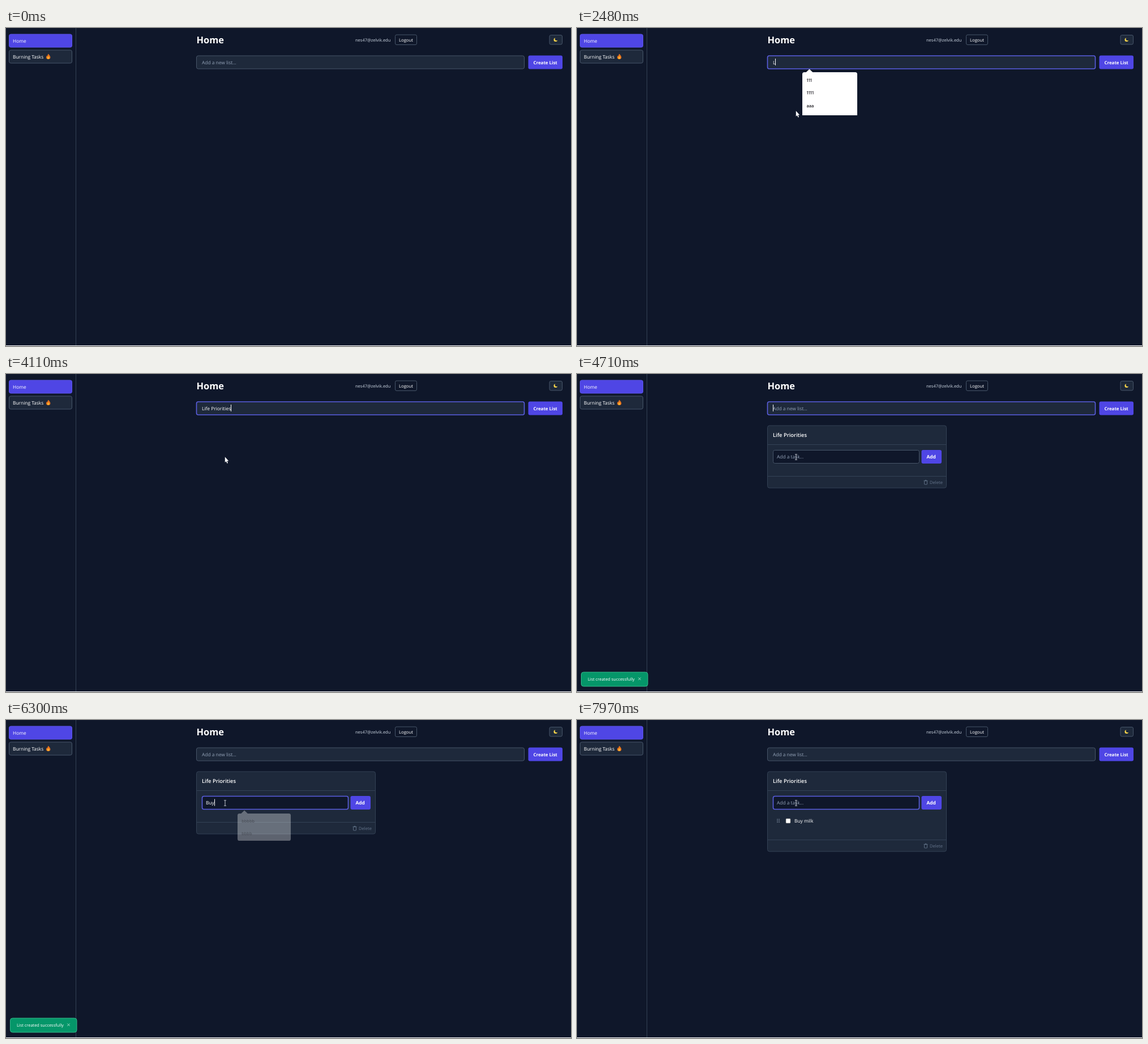
Animation of 998x561 px, one loop 8 s. Source, as an HTML page with a canvas:

```html
<!DOCTYPE html>
<html lang="en">
<head>
<meta charset="utf-8">
<title>Task lists</title>
<style>
html, body { margin: 0; width: 100%; height: 100%; overflow: hidden; background: #0f172a; }
canvas { display: block; width: 998px; height: 561px; }
</style>
</head>
<body>
<canvas id="stage"></canvas>
<script>
const W = 998, H = 561, LOOP = 8000;
const BG = '#0f172a', PANEL = '#1e293b', EDGE = '#475569', LINE = '#334155';
const INDIGO = '#4f46e5', RING = '#5a5ee0', MUTED = '#94a3b8', DIM = '#64748b', WHITE = '#fff';
const SANS = '"Open Sans", "Noto Sans", sans-serif';
const MENU = 'Inter, Roboto, sans-serif';

const stage = document.getElementById('stage');
const ratio = window.devicePixelRatio || 1;
stage.width = W * ratio;
stage.height = H * ratio;
const c = stage.getContext('2d');
c.scale(ratio, ratio);
c.textRendering = 'geometricPrecision';

// Typing: moment at which each character appears
const LIST = {
  text: 'Life Priorities',
  keys: [2480, 2680, 2780, 2900, 3040, 3440, 3510, 3590, 3660, 3740, 3810, 3960, 4040, 4040, 4110],
  cleared: 4660
};
const TASK = {
  text: 'Buy milk',
  keys: [5930, 6200, 6300, 6450, 6840, 6930, 7010, 7260],
  cleared: 7970
};

const within = (t, from, to) => t >= from && t < to;
const ramp = (t, from, to) => Math.min(1, Math.max(0, (t - from) / (to - from)));
const ease = k => k * k * (3 - 2 * k);
const typed = (s, t) => t < s.cleared ? s.text.slice(0, s.keys.filter(k => k <= t).length) : '';

function box(x, y, w, h, r, fill, stroke, width = 1) {
  c.beginPath();
  c.roundRect(x, y, w, h, r);
  if (fill) { c.fillStyle = fill; c.fill(); }
  if (stroke) { c.strokeStyle = stroke; c.lineWidth = width; c.stroke(); }
}

function label(text, x, y, size = 8.4, color = WHITE, weight = 400, family = SANS) {
  c.font = `${weight} ${size}px ${family}`;
  c.fillStyle = color;
  c.fillText(text, x, y);
  return c.measureText(text).width;
}

function strokes(color, width, ...lines) {
  c.strokeStyle = color;
  c.lineWidth = width;
  c.beginPath();
  for (const [x1, y1, x2, y2] of lines) { c.moveTo(x1, y1); c.lineTo(x2, y2); }
  c.stroke();
}

function disc(x, y, r, color) {
  c.fillStyle = color;
  c.beginPath();
  c.arc(x, y, r, 0, 7);
  c.fill();
}

function shape(path, x, y, color) {
  c.save();
  c.translate(x, y);
  c.fillStyle = color;
  c.fill(new Path2D(path));
  c.restore();
}

function field(x, y, w, fill, focused) {
  box(x + .5, y + .5, w - 1, 23, 3, fill, focused ? RING : EDGE, focused ? 1.6 : 1);
}

function fieldText(value, hint, x, y, caret) {
  const w = value ? label(value, x, y) : 0;
  if (!value) label(hint, x, y, 8.4, MUTED);
  if (caret) {
    c.fillStyle = WHITE;
    c.fillRect(Math.round(x + w), y - 9.7, 1, 12);
  }
}

function menu(x, y, items, alpha, cut = H) {
  if (alpha <= 0) return;
  const w = 97, scale = 1 - .045 * (1 - alpha);
  c.save();
  c.beginPath();
  c.rect(0, 0, W, cut);
  c.clip();
  c.globalAlpha = alpha;
  c.translate(x + w / 2, y + 30);
  c.scale(scale, scale);
  c.translate(-w / 2, -30);
  c.fillStyle = WHITE;
  c.beginPath();
  c.roundRect(0, 0, w, items.length * 22.45 + 4.8, 3.5);
  c.moveTo(6.5, .2);
  c.lineTo(12.5, -5.5);
  c.lineTo(18.5, .2);
  c.fill();
  items.forEach((s, i) => label(s, 7.5, 16.8 + i * 22.45, 7.6, '#15141a', 500, MENU));
  c.restore();
}

function page() {
  c.fillStyle = BG;
  c.fillRect(0, 0, W, H);
  c.fillStyle = WHITE;
  c.fillRect(0, 560, W, 1);
  strokes(LINE, 1, [123.5, 0, 123.5, 560]);

  box(5.5, 11, 111, 23, 3, INDIGO, '#5b53e8');
  label('Home', 12, 25.5);
  box(5.5, 39, 111, 23, 3, PANEL, EDGE);
  label('Burning Tasks', 12, 53.5);
  shape('M.3-4.8C1 -3 3.7-1.500 3.700 1.500C3.700 3.500 2 4.600 0 4.600C-2.200 4.600-3.700 3.400-3.700 1.300C-3.700 0-3-1-2.300-2C-2-1.400-1.700-1-1.300-.8C-1.400-2.500-.8-4 .3-4.800Z', 74.700, 50.400, '#e8721c');
  shape('M.2-.6C1 .6 2 1.200 2 2.600C2 3.700 1 4.300 0 4.300C-1.200 4.300-2 3.600-2 2.500C-2 1.300-.4 .7 .2-.6Z', 74.700, 50.400, '#f9b233');

  label('Home', 336.5, 27.3, 16.4, WHITE, 700);
  label('nes47@zelvik.edu', 617, 23.5, 7.5, '#cbd5e1');
  box(687.5, 12, 38, 17.500, 2.500, BG, EDGE);
  label('Logout', 694, 23.500, 7.7);
  box(960, 12.500, 22.500, 16.500, 2.500, PANEL, EDGE);
  disc(970.800, 20.700, 3.300, '#fdd94b');
  disc(972.400, 19.200, 2.800, PANEL);
  box(922.5, 48.5, 60.5, 24, 3, INDIGO);
  label('Create List', 931.5, 63.6, 7.9, WHITE, 700);
}

function card(t) {
  const added = t >= 7920, focused = t >= 5460;
  const foot = added ? 211.5 : 180.5;
  box(336.5, 91, 316, foot - 70.5, 3.5, PANEL, LINE);
  strokes(LINE, 1, [337, 124.5, 652, 124.5], [337, foot, 652, foot]);
  label('Life Priorities', 346, 111.3, 9.4, WHITE, 600);
  field(346, 134, 259, BG, focused);
  fieldText(typed(TASK, t), 'Add a task...', 353, 149.2, within(t, 5460, 7760));
  box(608.5, 134, 35.500, 24, 3, INDIGO);
  label('Add', 617.5, 149, 8.4, WHITE, 700);

  if (added) {
    for (let i = 0; i < 6; i++) disc(354 + i % 2 * 3, 175.300 + (i >> 1) * 2.500, .75, MUTED);
    box(369, 174, 8, 8, 1.200, WHITE, '#767676', .6);
    label('Buy milk', 384, 181.4);
  }

  const y = foot + 10.5;
  label('Delete', 623, y + 2.700, 7.6, DIM);
  strokes(DIM, .9, [612.5, y - 2.600, 619.500, y - 2.600], [614.700, y - 3.700, 617.300, y - 3.700]);
  box(613.500, y - 2.400, 5, 6.200, .8, null, DIM, .9);
}

function toast(t) {
  c.globalAlpha = ramp(t, 4450, 4700);
  box(7.5, 526, 117.500, 25, 4, '#059669', '#34b98a');
  label('List created successfully', 19, 541.4, 7.43);
  strokes('#b5e3d3', .9, [108.300, 535.500, 112.700, 539.900], [112.700, 535.500, 108.300, 539.900]);
  c.globalAlpha = 1;
}

function cursor(t) {
  if (t < 240) return;
  const a = ease(ramp(t, 220, 1010)), b = ease(ramp(t, 1760, 1970));
  const x = 925 - 469 * a - 69 * b, y = 529 - 466 * a + 83.5 * b;
  if (within(t, 1680, 1780) || within(t, 5410, 5460)) disc(x - 1.200, y - .7, 9.300, 'rgba(238, 232, 20, .55)');

  const overText = within(y, 48, 73) && x < 916 || t >= 4500;
  if (overText) {
    strokes('#d5dae2', .9,
      [x, y - 4.200, x, y + 4.200],
      [x - 2, y - 4.700, x + 2, y - 4.700],
      [x - 2, y + 4.700, x + 2, y + 4.700]);
  } else {
    shape('M0 0V9.600L2.100 7.600L3.800 11.400L5.200 10.700L3.600 7.100H6.500Z', x - .2, y - .2, WHITE);
  }
}

function menus(t) {
  const recent = ['111', '1111', 'aaa', 'lll', 'llll', 'll'];
  if (within(t, 1760, 2530)) menu(398, 78, recent, ramp(t, 1760, 1930), t < 2480 ? H : 154);
  if (within(t, 2530, 2850)) menu(398, 78, recent.slice(3), 1 - ramp(t, 2690, 2840));

  const tasks = ['aa', '11', 'dd', 'aaa', '111', 'ddd'];
  if (within(t, 5460, 5980)) menu(407.5, 164, tasks, ramp(t, 5430, 5560), t < 5930 ? H : 240);
  if (within(t, 5980, 6400)) menu(407.5, 164, ['bbbbb', 'bbbb'], 1 - ramp(t, 6210, 6345));
}

function draw(t) {
  page();
  field(336, 48.5, 580, PANEL, within(t, 1730, 5460));
  const caret = within(t, 1730, 2230) || within(t, 2480, 5160);
  fieldText(typed(LIST, t), 'Add a new list...', 346, 63.7, caret);
  if (t >= 4500) card(t);
  if (within(t, 4500, 7510)) toast(t);
  menus(t);
  cursor(t);
}

function tick() {
  draw(performance.now() % LOOP);
  requestAnimationFrame(tick);
}
tick();
</script>
</body>
</html>
```
